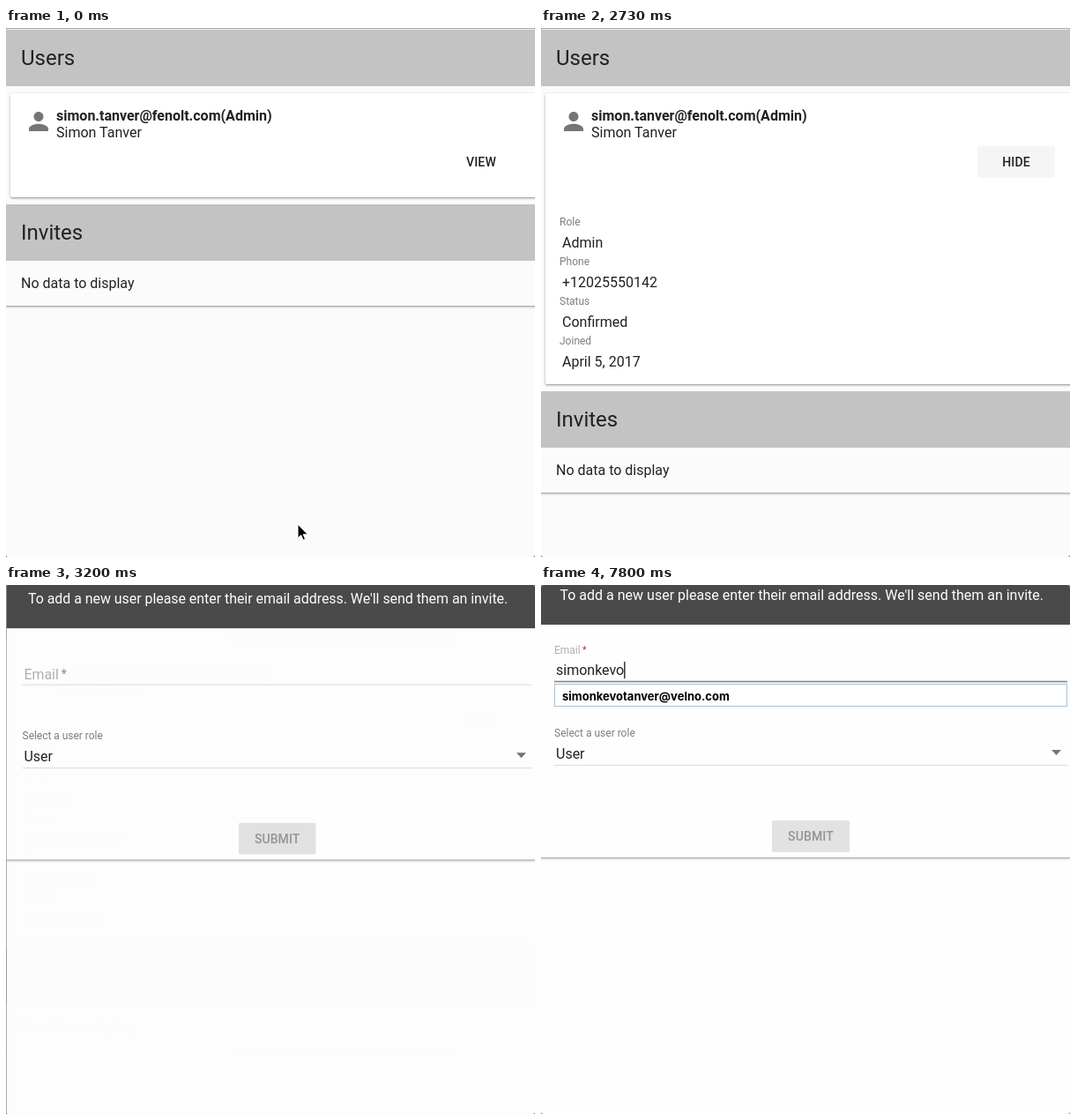
Animation of 600x600 px, one loop 8000 ms. Source, as an HTML page:

```html
<!DOCTYPE html>
<html lang="en">
<head>
<meta charset="utf-8">
<title>Add user</title>
<style>
  html, body { margin: 0; width: 100%; height: 100%; overflow: hidden; background: #777; }
  svg { display: block; width: 600px; height: 600px; border-radius: 3px; background: #fbfbfb; }
  text { font: 16px Roboto, sans-serif; fill: #212121; white-space: pre; }
  .title { font-size: 24px; }
  .bold { font-weight: 700; }
  .button { font-size: 14px; font-weight: 500; letter-spacing: .14px; text-anchor: middle; }
  .label { font-size: 12px; fill: #7d7d7d; }
  .bar { fill: #c3c3c3; }
  .raised { filter: drop-shadow(0 1px 1.5px rgba(0, 0, 0, .3)) drop-shadow(0 1px .5px rgba(0, 0, 0, .15)); }
  .floating { filter: drop-shadow(0 4px 6px rgba(0, 0, 0, .35)); }
  #popup text { font: 700 13px Inter, sans-serif; fill: #000; }
</style>
</head>
<body>
<svg viewBox="0 0 600 600">
  <g id="page">
    <rect width="600" height="1" fill="#aaa"/>
    <rect id="sheet" class="raised" x="-10" y="2" width="620" height="313" fill="#fbfbfb"/>
    <rect class="bar" y="2" width="600" height="64"/>
    <text class="title" x="17" y="42">Users</text>
    <rect id="card" class="raised" x="5" y="74" width="610" height="118" rx="2" fill="#fff"/>
    <path transform="translate(20.5 89.5) scale(1.375)" fill="#757575"
      d="M12 12c2.2 0 4-1.8 4-4s-1.8-4-4-4-4 1.8-4 4 1.8 4 4 4zm0 2c-2.7 0-8 1.3-8 4v2h16v-2c0-2.7-5.3-4-8-4z"/>
    <text class="bold" x="57" y="105">simon.tanver@fenolt.com(Admin)</text>
    <text x="57" y="124">Simon Tanver</text>
    <rect id="hover" x="495" y="134" width="88" height="36" rx="3"/>
    <text id="toggle" class="button" x="539" y="157"></text>
    <g id="details"></g>
    <g id="invites">
      <rect class="bar" y="200" width="600" height="64"/>
      <text class="title" x="17" y="240">Invites</text>
      <text x="17" y="295">No data to display</text>
    </g>
  </g>
  <rect id="backdrop" width="600" height="600"/>

  <g id="dialog">
    <rect class="floating" x="-3" y="-84" width="640" height="800" fill="#fefefe"/>
    <rect class="raised" x="-3" y="-84" width="640" height="393" fill="#fefefe"/>
    <rect class="bar" x="-3" y="-84" width="640" height="64"/>
    <text class="title" x="17" y="-43.5">Add New User</text>
    <circle cx="586" cy="-52" r="10" fill="#424242"/>
    <path d="M582-56l8 8m0-8l-8 8" stroke="#ddd" stroke-width="2"/>
    <rect x="-3" y="-20" width="640" height="65" fill="#4a4a4a"/>
    <text x="21.5" y="17" style="fill:#fff">To add a new user please enter their email address. We'll send them an invite.</text>
    <text id="emailLabel" style="fill:#b0b0b0">Email<tspan id="star" dx="3" dy="-1" font-size="14">*</tspan></text>
    <rect id="emailLine" x="15" width="582"/>
    <text id="typed" x="17" y="102"></text>
    <rect id="caret" y="87" width="1.2" height="19"/>
    <text id="roleLabel" style="fill:#7d7d7d">Select a user role</text>
    <text x="17" y="197">User</text>
    <path d="M579 187h11l-5.500 6z" fill="#757575"/>
    <rect x="15" y="204" width="582" height="1" fill="#dcdcdc"/>
    <rect x="262" y="267" width="88" height="36" rx="2" fill="#e2e2e2"/>
    <text class="button" x="306" y="290" style="fill:#949494">SUBMIT</text>
  </g>

  <g id="popup">
    <rect id="popupBox" x="15.500" y="112.500" width="581" fill="#fff" stroke="#a9c3d8"/>
    <text x="24" y="130.500">simonkevotanver@velno.com</text>
    <g id="moreRows">
      <text x="24" y="155.500">simon.tanver@fenolt.com</text>
      <text x="24" y="180.500">simontanver@velno.com</text>
    </g>
  </g>

  <g id="pointer">
    <path id="arrow" stroke="#fff" d="M0 0v15.500l3.600-3.300 2.400 5.500 2.500-1.100-2.400-5.300h5z"/>
    <path id="hand" fill="#fff" stroke="#000" stroke-width="1.200" stroke-linejoin="round"
      d="M-1.500 1.500C-1.500-.5 1.500-.5 1.500 1.500V6c1.500-.8 2.600 0 2.700.6 1.300-.5 2.300.2 2.400.9 1.300-.4 2.200.3 2.200 1.500v3c0 2-1.500 3-1.500 5H0c-.5-2-4-5-5-7.500-.5-1.600 1.300-2 2.200-1l1.300 1.500zM2 10v4m2.500-4v4"/>
    <path id="beam" fill="none" stroke="#111" stroke-width="1.300" d="M-3.500-7.500q3 0 3.500 1.500 .5-1.500 3.500-1.500M0-6V6M-3.500 7.500q3 0 3.500-1.500 .5 1.500 3.500 1.500M-2 1.500h4"/>
  </g>
</svg>
<script>
const LOOP = 8000, EXPAND = 1270, OPEN = 2906, FOCUS = 4370;
const NAME = "simonkevo";
const KEY_TIMES = [5200, 5470, 5670, 5870, 6070, 7000, 7270, 7530, 7730];
// time, x, y of the pointer; it is off stage between separate trips
const TRIPS = [
  [[0, 331, 563], [70, 331, 563], [730, 537, 138], [960, 531, 159], [1400, 531, 159], [1930, 568, 606]],
  [[3830, 604, 125], [4370, 189, 90], [5200, 189, 90]]
];

const el = id => document.getElementById(id);
const set = (id, attrs) => {
  for (const key in attrs) el(id).setAttribute(key, attrs[key]);
};
const show = (id, on) => set(id, { display: on ? "inline" : "none" });
const ramp = (t, start, length) => Math.min(1, Math.max(0, (t - start) / length));
const mix = (a, b, p) => a + (b - a) * p;
const smooth = p => p * p * (3 - 2 * p);

// cubic-bezier(.25, .8, .25, 1)
function swift(x) {
  let lo = 0, hi = 1;
  for (let i = 0; i < 24; i++) {
    const u = (lo + hi) / 2;
    if (.75 * u * (1 - u) + u ** 3 < x) lo = u; else hi = u;
  }
  return 2.4 * lo * (1 - lo) ** 2 + 3 * (1 - lo) * lo * lo + lo ** 3;
}

el("details").innerHTML = [
  ["Role", "Admin"], ["Phone", "+12025550142"], ["Status", "Confirmed"], ["Joined", "April 5, 2017"]
].map(([label, value], i) =>
  `<text class="label" x="21" y="${223.5 + 45 * i}">${label}</text><text x="24" y="${249 + 45 * i}">${value}</text>`
).join("");

function drawPage(t) {
  const open = t >= EXPAND, shift = open ? 212 : 0;
  set("sheet", { height: 313 + shift });
  set("card", { height: 118 + shift });
  set("invites", { transform: `translate(0 ${shift})` });
  show("details", open);
  el("toggle").textContent = open ? "HIDE" : "VIEW";
  set("hover", { fill: t < 2730 ? "#ededed" : "#f5f5f5", opacity: ramp(t, 670, 250) });
}

// a field label shrinks as it rises from the input line
function floatLabel(id, y, p) {
  set(id, { transform: `translate(${mix(17, 15, p)} ${mix(y, y - 25.5, p)}) scale(${mix(1, .75, p)})` });
}

function drawDialog(t) {
  const p = swift(ramp(t, OPEN, 370));
  set("backdrop", { opacity: .48 * ramp(t, OPEN, 370) });
  show("dialog", t >= OPEN);
  set("dialog", { opacity: p, transform: `translate(${572 * (1 - p)} ${690 * (1 - p)}) scale(${p})` });
  floatLabel("roleLabel", 197, p);

  const f = swift(ramp(t, FOCUS, 350));
  floatLabel("emailLabel", 103, f);
  set("star", { fill: f > 0 ? "#a02a4c" : "#888" });
  set("emailLine", { y: mix(109, 108.7, f), height: mix(1, 1.7, f), fill: f > 0 ? "#8a8a8a" : "#dcdcdc" });
}

function drawTyping(t) {
  const count = KEY_TIMES.filter(k => k <= t).length;
  el("typed").textContent = NAME.slice(0, count);
  const since = t - (count ? KEY_TIMES[count - 1] : FOCUS);
  show("caret", since >= 0 && since % 960 < 480);
  set("caret", { x: 17 + (count ? el("typed").getComputedTextLength() : 0) });
  const rows = count > 5 ? 1 : 3;
  show("popup", count > 0);
  show("moreRows", rows > 1);
  set("popupBox", { height: 25 * rows });
}

function drawPointer(t) {
  const trip = TRIPS.find(s => t >= s[0][0] && t < s[s.length - 1][0]);
  show("pointer", trip);
  if (!trip) return;
  const i = trip.findIndex(stop => t < stop[0]);
  const [t0, x0, y0] = trip[i - 1], [t1, x1, y1] = trip[i];
  const p = smooth(ramp(t, t0, t1 - t0));
  const x = mix(x0, x1, p), y = mix(y0, y1, p);
  const hand = t < OPEN && x > 495 && y > 134 && y < 170;
  const beam = t > OPEN && y < 112;
  set("pointer", { transform: `translate(${x} ${y})` });
  show("hand", hand);
  show("beam", beam);
  show("arrow", !hand && !beam);
}

function frame() {
  const t = performance.now() % LOOP;
  drawPage(t);
  drawDialog(t);
  drawTyping(t);
  drawPointer(t);
  requestAnimationFrame(frame);
}
frame();
</script>
</body>
</html>
```
